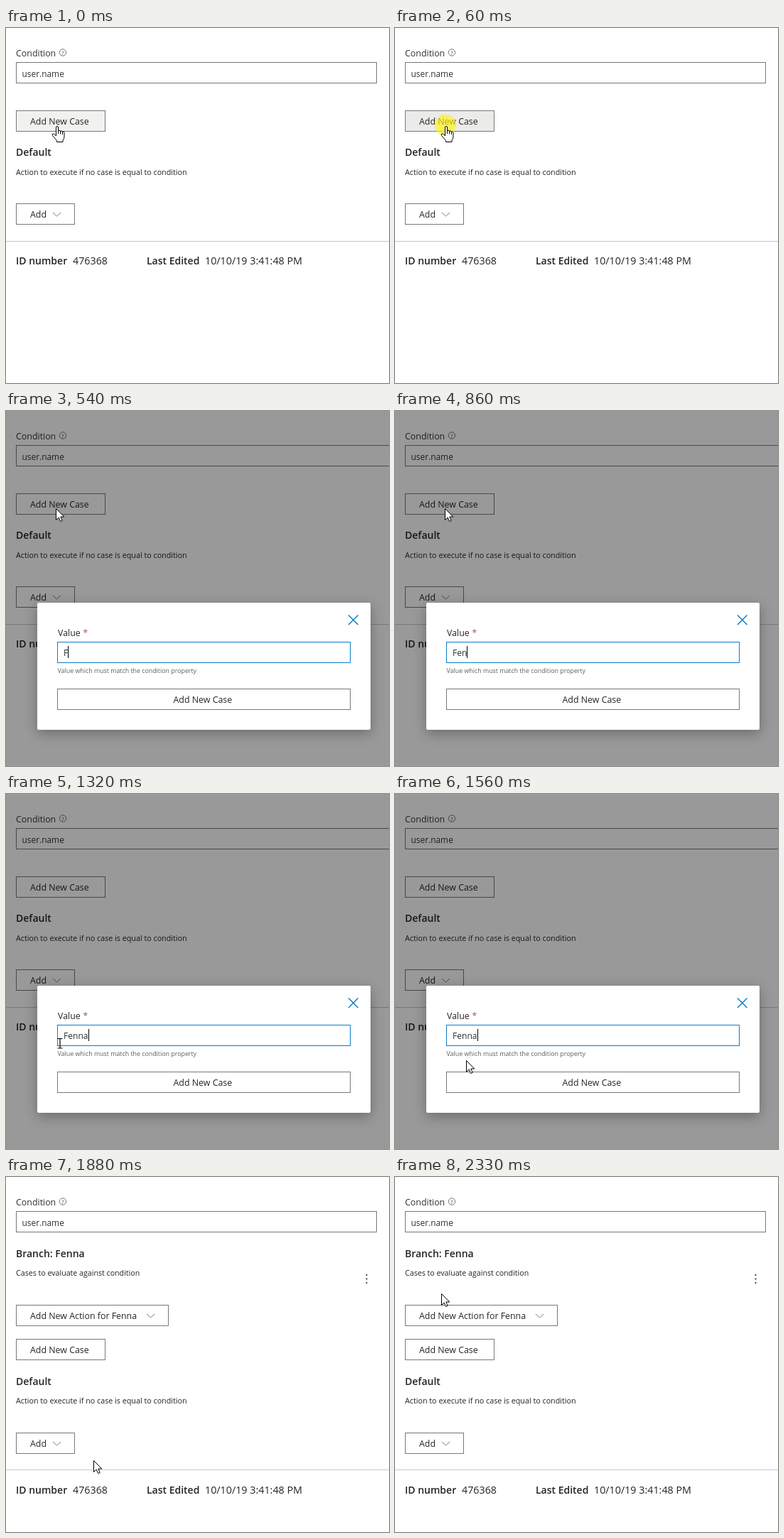
An HTML page with a canvas for the animation above (2.43 s loop, 539 by 500 pixels).

```html
<!DOCTYPE html>
<html lang="en">
<head>
<meta charset="utf-8">
<title>Add a case</title>
<style>
html, body { margin: 0; width: 100%; height: 100%; overflow: hidden; background: #fff; }
canvas { display: block; }
</style>
</head>
<body>
<canvas id="stage" width="539" height="500"></canvas>
<script>
const ctx = document.getElementById('stage').getContext('2d');
const LOOP = 2430;
const NAME = 'Fenna';
const KEYS = [540, 690, 860, 1010, 1090];
const INK = '#252423', LINE = '#7a7876', BLUE = '#0a7cc9';
const HOVER = '#f1f1f0', PRESSED = '#ebebea';

function text(str, x, y, size, weight = 400, color = INK) {
  ctx.font = `${weight} ${size}px "Open Sans", "Noto Sans", sans-serif`;
  ctx.fillStyle = color;
  ctx.fillText(str, x, y);
  return ctx.measureText(str).width;
}

function box(x, y, w, h, fill, stroke = LINE) {
  ctx.fillStyle = fill;
  ctx.fillRect(x, y, w, h);
  ctx.strokeStyle = stroke;
  ctx.lineWidth = 1;
  ctx.strokeRect(x + .5, y + .5, w - 1, h - 1);
}

function path(points, color, width) {
  ctx.beginPath();
  points.forEach(([x, y]) => ctx.lineTo(x, y));
  ctx.strokeStyle = color;
  ctx.lineWidth = width;
  ctx.stroke();
}

function button(label, y, w, fill = '#fff', arrow = false) {
  box(14, y, w, 30, fill);
  text(label, 34, y + 20, 12.4, 500);
  if (arrow) {
    const x = w - 17;
    path([[x, y + 13], [x + 5.5, y + 18], [x + 11, y + 13]], '#807a72', 1);
  }
}

function condition(w) {
  text('Condition', 14, 40, 12.4, 400, '#323130');
  ctx.beginPath();
  ctx.arc(80, 34.5, 4.7, 0, 7);
  ctx.strokeStyle = '#666';
  ctx.lineWidth = .9;
  ctx.stroke();
  text('?', 78.2, 37.5, 8, 400, '#444');
  box(14, 48, w, 30, '#fff');
  text('user.name', 22.5, 69, 11.9, 400, '#323130');
}

function lowerPart(d, caseFill) {
  const e = d && d + 1;
  button('Add New Case', 116 + d, 126, caseFill);
  text('Default', 14, 180 + e, 14, 600);
  text('Action to execute if no case is equal to condition', 14, 207 + d, 10.75);
  button('Add', 247 + e, 83, '#fff', true);
  ctx.fillStyle = '#c8c8c8';
  ctx.fillRect(0, 300 + d, 539, 1);
  text('ID number', 14, 333 + e, 14, 600);
  text('476368', 94, 333 + e, 14.3);
  text('Last Edited', 198, 333 + e, 14, 600);
  text('10/10/19 3:41:48 PM', 280, 333 + e, 14.3);
}

function branch(fill) {
  text('Branch: ' + NAME, 14, 113, 14, 600);
  text('Cases to evaluate against condition', 14, 139, 10.65);
  ctx.fillStyle = INK;
  for (let y = 138; y < 151; y += 5.5) {
    ctx.beginPath();
    ctx.arc(507.5, y, 1.1, 0, 7);
    ctx.fill();
  }
  button('Add New Action for ' + NAME, 180, 215, fill, true);
}

function dialog(value, focused, fill) {
  ctx.fillStyle = 'rgba(0,0,0,.4)';
  ctx.fillRect(0, 0, 539, 500);
  ctx.save();
  ctx.shadowColor = 'rgba(0,0,0,.3)';
  ctx.shadowBlur = 18;
  ctx.shadowOffsetY = 5;
  ctx.fillStyle = '#fff';
  ctx.beginPath();
  ctx.roundRect(44, 270, 469, 179, 2);
  ctx.fill();
  ctx.restore();
  path([[482, 287.5], [495.5, 301]], BLUE, 1.5);
  path([[495.5, 287.5], [482, 301]], BLUE, 1.5);
  text('Value', 73, 317, 12.4, 500);
  text('*', 108.5, 317, 12, 400, '#a0545a');
  box(72, 325, 413, 30, '#fff', focused ? BLUE : LINE);
  const w = text(value, 81, 345, 12.1, 400, '#323130');
  if (focused) {
    ctx.fillStyle = '#000';
    ctx.fillRect(Math.round(81 + w), 331, 1, 17);
  }
  text('Value which must match the condition property', 72.5, 369, 8.85, 400, '#605e5c');
  box(72, 391, 413, 30, fill);
  text('Add New Case', 235.5, 411, 12.4, 500);
}

const SHAPES = {
  arrow: new Path2D('M.5 .5V16.5L4.2 13L6.6 18.5L9.2 17.4L6.8 12H11.8Z'),
  hand: new Path2D('M.5 14V2Q.5 .5 2 .5T3.5 2V7.5Q3.5 6.2 5 6.2T6.5 8Q6.5 7 8 7T9.4 8.8Q9.6 8 10.6 8Q12 8 12 9.8V15Q12 18 10 20V22.5H1.5V20.5L-4.5 13.5Q-5.5 11.7 -4 11Q-2.5 10.5 -1 12.3Z'),
  beam: new Path2D('M-3.5 -6.5H-1Q0 -6.5 0 -5.5Q0 -6.5 1 -6.5H3.5M0 -5.5V6M-3.5 7H-1Q0 7 0 6Q0 7 1 7H3.5')
};

function cursor(kind, x, y) {
  ctx.save();
  ctx.translate(x, y);
  ctx.lineWidth = kind === 'beam' ? 1.2 : 1;
  ctx.lineJoin = 'round';
  ctx.fillStyle = '#fff';
  ctx.strokeStyle = '#000';
  if (kind !== 'beam') ctx.fill(SHAPES[kind]);
  ctx.stroke(SHAPES[kind]);
  if (kind === 'hand') {
    path([[3.5, 7], [3.5, 11]], '#000', 1);
    path([[6.5, 8], [6.5, 11.5]], '#000', 1);
    path([[9.4, 9], [9.4, 12]], '#000', 1);
  }
  ctx.restore();
}

function clickSpot(x, y) {
  ctx.fillStyle = 'rgba(255,243,20,.68)';
  ctx.beginPath();
  ctx.arc(x, y, 15, 0, 7);
  ctx.fill();
}

// The pointer is sampled in six jumps along an eased straight path.
function glide(t, start, end, [x0, y0], [x1, y1]) {
  const p = Math.max(0, Math.min(6, Math.floor((t - start) / (end - start) * 6 + .01))) / 6;
  const k = p * p * (3 - 2 * p);
  return [Math.round(x0 + (x1 - x0) * k), Math.round(y0 + (y1 - y0) * k)];
}

const within = (v, low, size = 30) => v >= low && v < low + size;

function draw(t) {
  ctx.fillStyle = '#fff';
  ctx.fillRect(0, 0, 539, 500);

  if (t < 230) {
    const pressed = t >= 60;
    condition(508);
    lowerPart(0, pressed ? PRESSED : HOVER);
    if (pressed) clickSpot(71, 137);
    cursor('hand', 70, 138);
  } else if (t < 1880) {
    const clicked = t >= 1790;
    const [x, y] = t < 1320 ? [70, 137] : glide(t, 1320, 1790, [76, 351], [123, 398]);
    const over = within(y, 391);
    const typed = KEYS.filter(k => t >= k).length;
    condition(540);
    lowerPart(0, '#fff');
    dialog(NAME.slice(0, typed), !clicked, clicked ? PRESSED : over ? HOVER : '#fff');
    if (clicked) clickSpot(x, y);
    cursor(over ? 'hand' : within(y, 325) ? 'beam' : 'arrow', x, y);
  } else {
    const [x, y] = glide(t, 1880, 2330, [123, 399], [65, 164]);
    const overAction = within(y, 180), overCase = within(y, 228);
    condition(508);
    branch(overAction ? HOVER : '#fff');
    lowerPart(112, overCase ? HOVER : '#fff');
    cursor(overAction || overCase ? 'hand' : 'arrow', x, y);
  }
}

const begin = performance.now();
function tick() {
  draw((performance.now() - begin) % LOOP);
  requestAnimationFrame(tick);
}
tick();
</script>
</body>
</html>
```
